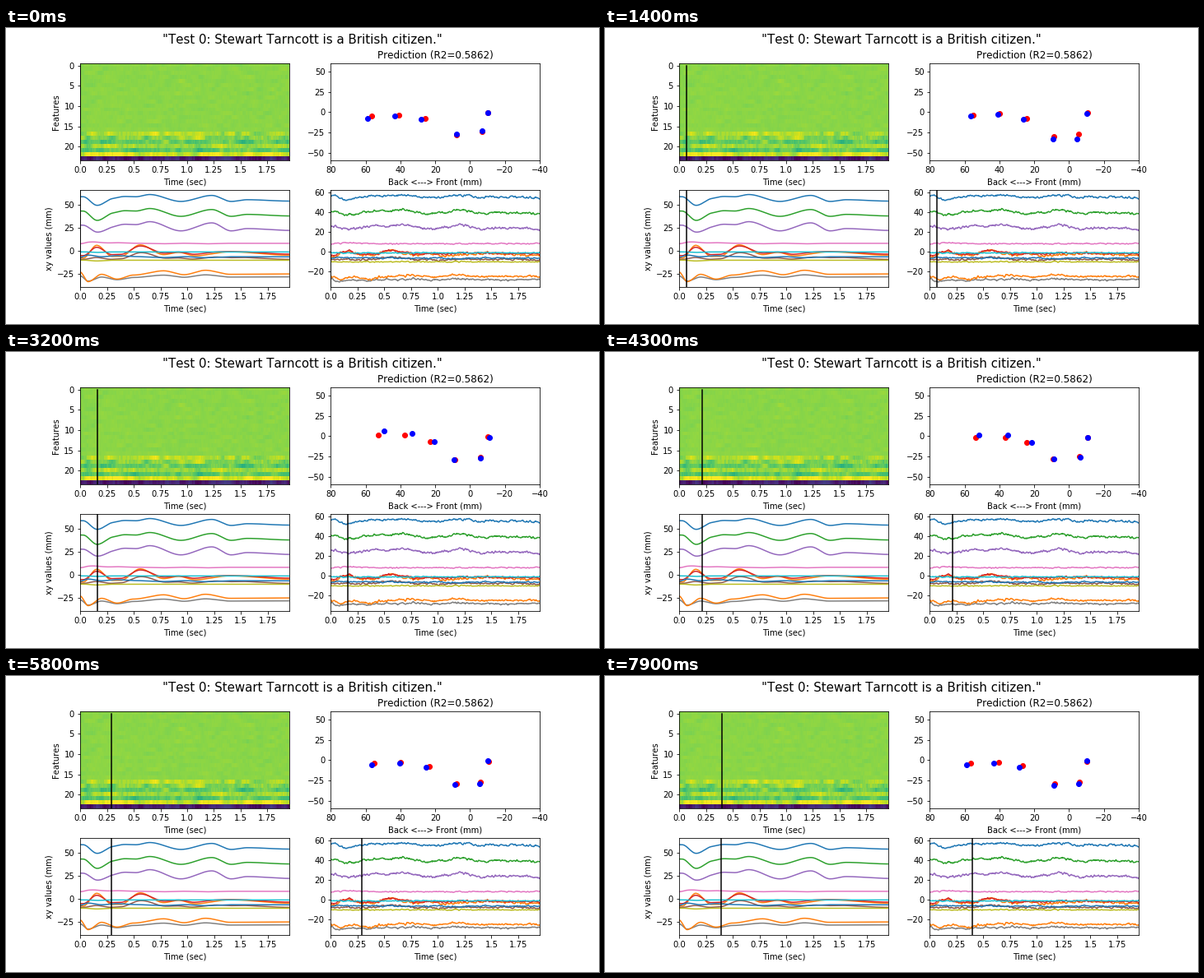
Write a matplotlib script that moves like this. It is 720 by 360 pixels and loops after 8000 ms.

```python
import numpy as np
import matplotlib.pyplot as plt
from matplotlib.animation import FuncAnimation

plt.rcParams["font.family"] = "DejaVu Sans"
plt.rcParams["text.kerning_factor"] = 6
FRAMES, INTERVAL = 80, 100
RATE, N = 200, 391            # samples per second, samples
t = np.arange(N) / RATE
rng = np.random.default_rng(7)


def ease(*turns):
    """Smooth curve that swings between (time, value) turning points."""
    keys, vals = np.array(turns).T
    i = np.clip(np.searchsorted(keys, t, side="right") - 1, 0, len(keys) - 2)
    s = np.clip((t - keys[i]) / (keys[i + 1] - keys[i]), 0, 1)
    return vals[i] + (vals[i + 1] - vals[i]) * s * s * (3 - 2 * s)


def noise(width, n=N):
    raw = rng.normal(size=n + 2 * width)
    out = np.convolve(raw, np.ones(width) / np.sqrt(width), "same")
    return out[width:width + n]


# Gestures shared by all sensors
GESTURES = dict(
    back=ease((0, .55), (.24, .3), (.42, .72), (.52, .68), (.65, 1), (.94, 0),
              (1.23, .87), (1.41, 0), (1.56, .25), (1.95, .05)),
    rise=ease((.03, -.15), (.155, 1), (.3, 0)),
    lift=ease((.38, 0), (.56, 1), (.78, .15), (.92, .35), (1.07, .05),
              (1.4, .4), (1.95, .1)),
    lip=ease((0, .6), (.075, -2), (.2, 0), (.345, -1.3), (.5, -.2), (.78, .95),
             (.97, -.1), (1.17, 1.1), (1.4, 0), (1.95, .1)),
)

# x and y of each sensor: rest level plus weighted gestures
CHANNELS = [
    dict(level=53.7, back=7.5, rise=-7), dict(level=-6, rise=12, lift=12.5),
    dict(level=37.5, back=8.5, rise=-7.5), dict(level=-4.5, back=1, rise=8, lift=9),
    dict(level=21.7, back=10, rise=-5), dict(level=-10, back=2, rise=2, lift=6.5),
    dict(level=8.2, rise=1, lip=-.5), dict(level=-28.5, lip=2.2),
    dict(level=-10.2, rise=-.8), dict(level=-1.2, rise=-.5),
    dict(level=-6.4, lip=-.9), dict(level=-25.5, lip=4),
]


def measure(level, **weights):
    return level + sum(w * GESTURES[name] for name, w in weights.items())


def predict(track):
    """A damped, jittery version of the measured track."""
    rough = min(.9, .35 + .15 * np.std(track))
    jitter = rough * (.65 * noise(3) + .45 * noise(9))
    return np.median(track) + .42 * (track - np.median(track)) + jitter


def feature_map():
    level = np.full(24, .825)
    level[17:] = .87, .82, .76, .86, .74, .95, .07
    spread = np.where(np.arange(24) < 17, .008, .045)
    return np.array([m + s * noise(12) for m, s in zip(level, spread)])


true = np.array([measure(**c) for c in CHANNELS])
pred = np.array([predict(track) for track in true])

fig, axes = plt.subplots(2, 2, figsize=(10, 5), dpi=72)
fig.subplots_adjust(left=.125, right=.9, bottom=.125, top=.88,
                    wspace=.2, hspace=.3)
fig.suptitle('"Test 0: Stewart Tarncott is a British citizen."', fontsize=15)
(heat, dots), (left, right) = axes

heat.imshow(feature_map(), cmap="viridis", vmin=0, vmax=1, aspect="auto",
            interpolation="nearest")
heat.set_yticks(range(0, 24, 5))
heat.set_ylabel("Features")

for ax, data, lim, ticks in (
        (left, true, (-39.3, 66.3), range(-25, 51, 25)),
        (right, pred, (-35.8, 62.7), range(-20, 61, 20))):
    ax.plot(data.T)
    ax.set(xlim=(0, N - 1), ylim=lim, yticks=ticks)
left.set_ylabel("xy values (mm)")

for ax in (heat, left, right):
    marks = range(0, N, 50)
    ax.set_xticks(marks, [str(k / RATE) for k in marks])
    ax.set_xlabel("Time (sec)")

dots.set(xlim=(80, -40), ylim=(-60, 60), yticks=range(-50, 51, 25),
         xlabel="Back <---> Front (mm)")
dots.set_title("Prediction (R2=0.5862)", fontsize=12)
red, = dots.plot([], [], "o", color="red")
blue, = dots.plot([], [], "o", color="blue")

cursors = heat.plot([0, 0], [0, 23.5], color="black")
cursors += [ax.axvline(0, color="black") for ax in (left, right)]
heat.set(xlim=(-.5, N - .5), ylim=(23.5, -.5))


def draw(i):
    red.set_data(pred[::2, i], pred[1::2, i])
    blue.set_data(true[::2, i], true[1::2, i])
    for line in cursors:
        line.set_xdata([i, i])
    return [red, blue, *cursors]


anim = FuncAnimation(fig, draw, frames=FRAMES, interval=INTERVAL,
                     repeat=True, repeat_delay=0, blit=False)
plt.show()
```
